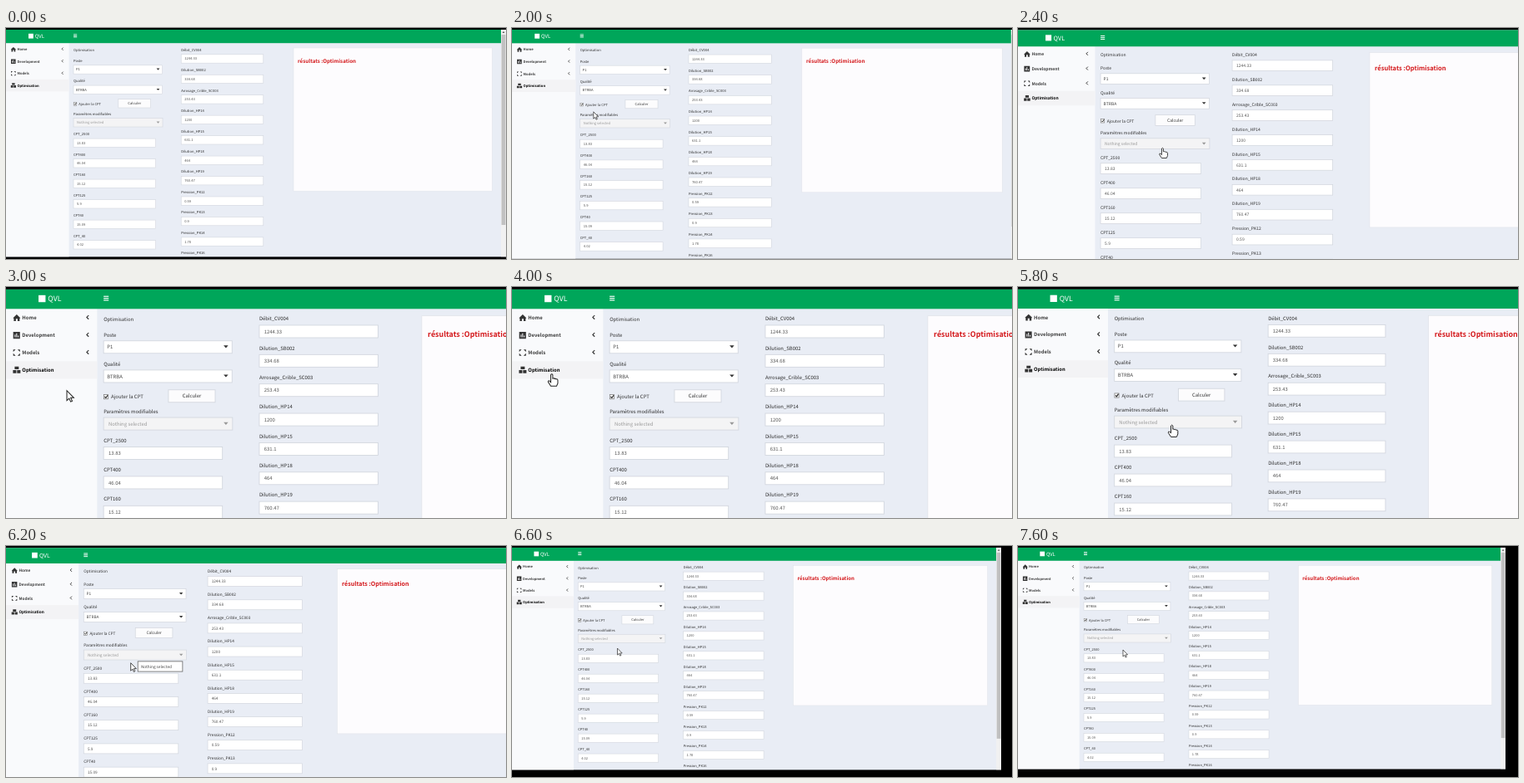
Animation, 600 px wide and 278 px high, one loop 8 s. Source, as an HTML page:

```html
<!DOCTYPE html>
<html lang="fr">
<head>
<meta charset="utf-8">
<title>Optimisation</title>
<style>
html, body { margin: 0; width: 100%; height: 100%; overflow: hidden; background: #000; }
svg { display: block; width: 100vw; height: 100vh; }
text { font-family: "Noto Sans CJK JP", "Noto Sans CJK SC", "Lato", sans-serif; text-rendering: geometricPrecision; }
</style>
</head>
<body>
<svg viewBox="0 0 600 278" preserveAspectRatio="none">
  <g id="page">
    <g id="ui"></g>
    <g id="tip">
      <rect x="137.4" y="120.6" width="46.6" height="10.6" fill="#fff" stroke="#666" stroke-width=".7"/>
    </g>
    <path id="arrow" d="M0 0V8.2L1.9 6.5L3.2 9.3L4.5 8.7L3.2 6H5.8Z" fill="#fff" stroke="#222" stroke-width=".7"/>
    <path id="hand" d="M-.8 .6Q0-.6.8.6V3.6Q1.6 3 2.2 3.9Q3 3.3 3.6 4.2Q4.7 3.8 5 5V7.6L4 10H-.8L-3 6.6Q-3.2 5.2-2 5.6L-.8 6.8Z" fill="#fff" stroke="#222" stroke-width=".7"/>
  </g>
</svg>
<script>
const LOOP = 8000, STEP = 200, FONT = 4.1;
const $ = id => document.getElementById(id);

const rect = (x, y, w, h, fill, extra = '') =>
  `<rect x="${x}" y="${y}" width="${w}" height="${h}" fill="${fill}" ${extra}/>`;
const path = (d, fill, extra = '') => `<path d="${d}" fill="${fill}" ${extra}/>`;
const text = (x, mid, str, fill = '#333', size = FONT, extra = '') =>
  `<text x="${x}" y="${mid + size * .36}" font-size="${size}" fill="${fill}" ${extra}>${str}</text>`;
const label = (x, mid, str) => text(x, mid, str, '#2b2b2b', FONT, 'font-weight="500"');
const box = (x, mid, w, fill = '#fff') =>
  rect(x, mid - 5.2, w, 10.4, fill, 'stroke="#d2d6de" stroke-width=".6"');
const field = (x, mid, name, value) =>
  label(x, mid, name) + box(x, mid + 10.7, 98.6) + text(x + 4, mid + 10.7, value, '#555');
const caret = (mid, fill) => path(`M180.6 ${mid - 1}h3.8l-1.9 2.2z`, fill);
const select = (mid, value) =>
  box(81, mid, 106.6) + text(83.9, mid, value, '#444') + caret(mid - .4, '#333');

function menu() {
  const icons = [
    'M5.9 25.8L8.9 22.9L11.9 25.8L11.3 26.3V28.4H9.6V26.4H8.2V28.4H6.5V26.3Z',
    'M6 37.4h5.6v5.6h-5.6zM7.2 39.6v2.2h.7v-2.2zM8.5 38.5v3.3h.7v-3.3zM9.8 40.4v1.4h.7v-1.4z',
    'M6 52h2l-2 2zM11.6 52v2l-2-2zM6 57.2v-2l2 2zM11.6 57.2h-2l2-2z',
    'M7.2 66.3h3.4v2.2h-3.4zM5.8 69.1h2.8v2.6h-2.8zM9.2 69.1h2.8v2.6h-2.8z'
  ];
  return ['Home', 'Development', 'Models', 'Optimisation'].map((name, i) => {
    const mid = 25.6 + 14.53 * i, last = i == 3;
    return (last ? rect(0, 61.8, 75.6, 14.6, '#f3f3f5') : '') +
      path(icons[i], '#333', 'fill-rule="evenodd"') +
      text(13.4, mid, name, last ? '#000' : '#3a3a3a', FONT, 'font-weight="600"') +
      (last ? '' : path(`M68.6 ${mid - 2}l-1.6 1.6l1.6 1.6`, 'none', 'stroke="#333" stroke-width=".8"'));
  }).join('');
}

function draw() {
  const left = [['CPT_2500', '13.83'], ['CPT400', '46.04'], ['CPT160', '15.12'],
    ['CPT125', '5.9'], ['CPT40', '15.09'], ['CPT_40', '4.02']];
  const right = [['Débit_CV004', '1244.33'], ['Dilution_SB002', '334.68'],
    ['Arrosage_Crible_SC003', '253.43'], ['Dilution_HP14', '1200'], ['Dilution_HP15', '631.1'],
    ['Dilution_HP18', '464'], ['Dilution_HP19', '760.47'], ['Pression_PK12', '0.59'],
    ['Pression_PK13', '0.9'], ['Pression_PK14', '1.78'], ['Pression_PK16', '']];
  $('ui').innerHTML =
    rect(0, 2, 600, 273.6, '#e9edf5') +
    rect(0, 18, 75.6, 257.6, '#f9fafc') + menu() +
    rect(0, 2, 594, 16.2, '#00a65a') +
    rect(27, 6.8, 5.8, 5.8, '#fff') + text(34.8, 9.8, 'QVL', '#fff', 6) +
    [7.4, 9, 10.6].map(y => rect(81, y, 4.2, .8, '#fff')).join('') +
    text(81, 26.7, 'Optimisation') +
    label(81, 39.8, 'Poste') + select(50, 'P1') +
    label(81, 64, 'Qualité') + select(74.3, 'BTRBA') +
    rect(81.2, 89.6, 3.6, 3.6, '#fff', 'stroke="#777" stroke-width=".5"') +
    path('M81.9 91.3l1 1l1.5-2.2', 'none', 'stroke="#222" stroke-width=".8"') +
    text(87.2, 91.5, 'Ajouter la CPT') +
    box(134.8, 90.8, 38.8, '#fcfcfd') + text(154.2, 90.8, 'Calculer', '#333', FONT, 'text-anchor="middle"') +
    label(81, 103.5, 'Paramètres modifiables') + box(81, 113.8, 107, '#f4f4f5') +
    text(85, 113.8, 'Nothing selected', '#999') + caret(113.6, '#999') +
    left.map(([n, v], i) => field(81, 127.6 + 24.5 * i, n, v)).join('') +
    right.map(([n, v], i) => field(210.2, 26.3 + 24.45 * i, n, v)).join('') +
    rect(345, 24, 238.4, 172.2, '#fdfcfe', 'stroke="#dfe2e8" stroke-width=".5"') +
    text(350, 39.6, 'résultats :Optimisation', '#d4191c', 6.2, 'font-weight="700"') +
    rect(594, 2, 6, 273.6, '#f1f1f1') + rect(594.6, 8, 4.8, 229, '#c1c1c1') +
    path('M595.5 6l1.5-2l1.5 2z', '#555') +
    rect(0, 275.6, 600, 20, '#000');
  $('tip').innerHTML += text(140.6, 125.9, 'Nothing selected', '#444');
}

const clamp = v => Math.min(1, Math.max(0, v));
const ease = p => p < .5 ? 4 * p ** 3 : 1 - 4 * (1 - p) ** 3;
const zoom = t =>
  1 + .446 * ease(clamp((t - 1800) / 1200)) - .471 * ease(clamp((t - 5545) / 1200));

// time, x, y of the pointer in page units
const track = [[400, 594, 232], [800, 330, 150], [1400, 72, 94], [1700, 72, 94], [2000, 97, 100],
  [2400, 141.8, 118], [3000, 50.5, 86.2], [4000, 33, 72.5], [4600, 26.5, 68.6], [4900, 26.5, 68.6],
  [5200, 103, 101.6], [5600, 128, 113], [5900, 130, 118], [6200, 130, 122.2],
  [7000, 128.6, 129.4], [7200, 128.6, 129.4], [7600, 129.2, 128.2]];

function pointer(t) {
  const i = track.findIndex(k => k[0] > t);
  if (i < 0) return track.at(-1).slice(1);
  const [t0, x0, y0] = track[i - 1], [t1, x1, y1] = track[i];
  const p = (t - t0) / (t1 - t0);
  return [x0 + (x1 - x0) * p, y0 + (y1 - y0) * p];
}

const show = (el, on) => el.setAttribute('visibility', on ? 'visible' : 'hidden');

function render(t) {
  $('page').setAttribute('transform', `scale(${zoom(t)})`);
  show($('tip'), t >= 6000 && t < 6600);
  const seen = t >= 400;
  const [x, y] = seen ? pointer(t) : [0, 0];
  const link = (x < 75 && y < 76.4) || (x > 81 && x < 188 && y > 108.5 && y < 119);
  for (const id of ['arrow', 'hand']) {
    $(id).setAttribute('transform', `translate(${x} ${y})`);
    show($(id), seen && link == (id == 'hand'));
  }
}

draw();
const start = performance.now();
function tick() {
  const t = (performance.now() - start) % LOOP;
  render(Math.floor(t / STEP) * STEP);
  requestAnimationFrame(tick);
}
render(0);
tick();
</script>
</body>
</html>
```
